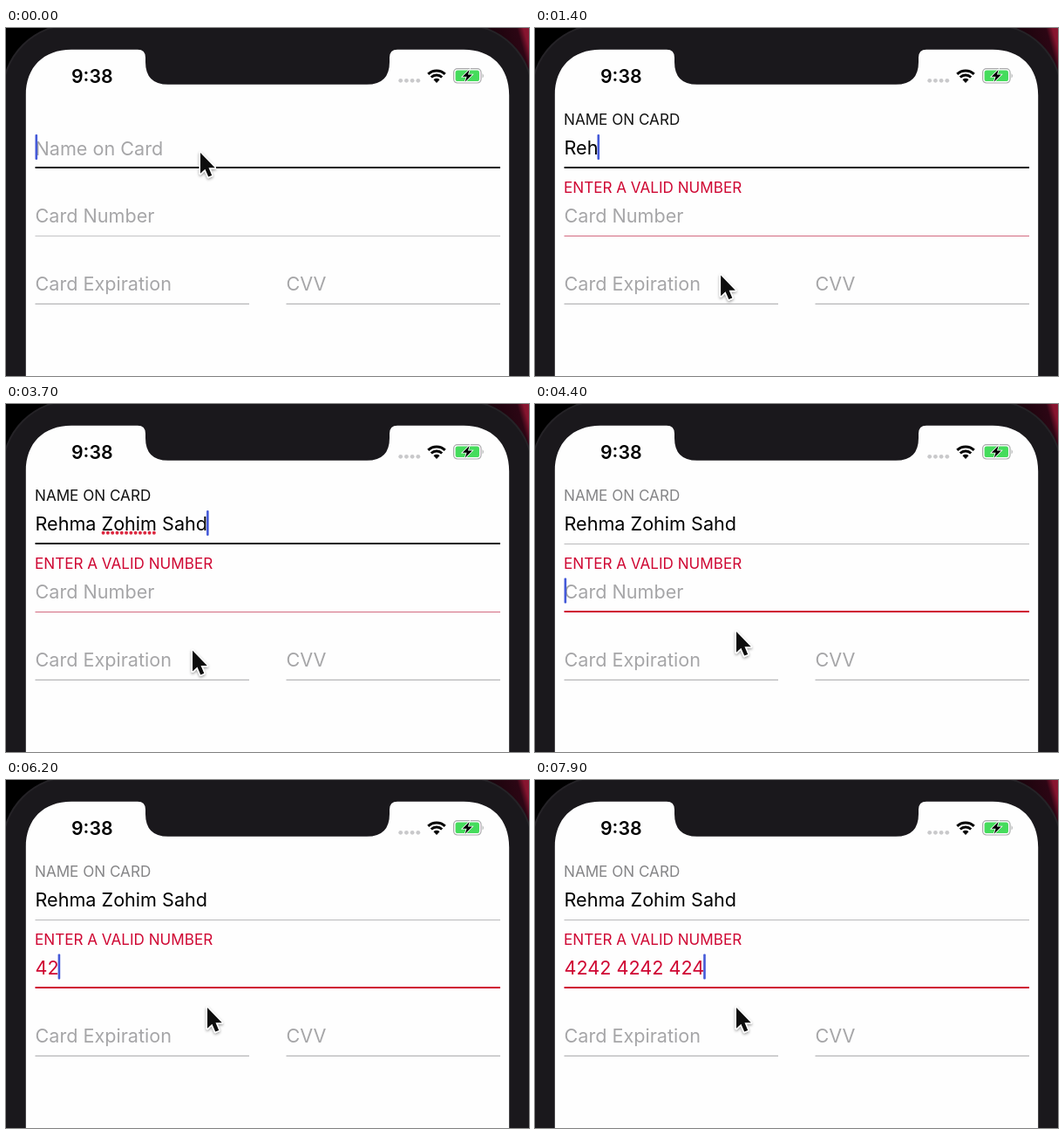
Animation, 600 px wide and 399 px high, one loop 8 s. Source, as an HTML page:

```html
<!DOCTYPE html>
<html lang="en">
<head>
<meta charset="utf-8">
<title>Card form</title>
<style>
  html, body { margin: 0; width: 100%; height: 100%; overflow: hidden; background: #000; }
  svg { display: block; width: 600px; height: 399px; }
  text { font: 400 21.6px Inter, "Liberation Sans", sans-serif; font-optical-sizing: none; white-space: pre; }
  .hint { fill: #a6a6a8; }
  .label { font-size: 17.1px; }
  .clock { font-size: 21.3px; font-weight: 600; }
  .line { stroke: #b6b6b8; stroke-width: 1.2; }
  .caret { fill: #4459d8; }
</style>
</head>
<body>
<svg viewBox="0 0 600 399">
  <defs>
    <linearGradient id="glow" gradientUnits="userSpaceOnUse" x1="550" y1="14" x2="600" y2="0">
      <stop offset="0" stop-color="#16030a"/>
      <stop offset=".74" stop-color="#2c0614"/>
      <stop offset=".88" stop-color="#86142f"/>
      <stop offset="1" stop-color="#8c1631"/>
    </linearGradient>
    <filter id="shadow" x="-50%" y="-50%" width="200%" height="200%">
      <feDropShadow dx="0" dy="1.5" stdDeviation="1.5" flood-opacity=".4"/>
    </filter>
  </defs>

  <rect width="600" height="399"/>
  <rect x="540" width="60" height="60" fill="url(#glow)"/>
  <rect x="-4" y="-4" width="608" height="500" rx="80" fill="#1a181c" stroke="#252327" stroke-width="2"/>
  <path fill="#fefefe" d="M22.8 399V77C22.8 45 43 24.8 75 24.8H151Q160 24.8 160 34V39Q160 64.8 186 64.8H414
    Q440 64.8 440 39V34Q440 24.8 449 24.8H525C557 24.8 577.2 45 577.2 77V399Z"/>

  <text class="clock" x="75" y="62.8">9:38</text>
  <g fill="#c9c9cb">
    <circle cx="452.7" cy="60.3" r="2.4"/><circle cx="459.4" cy="60.3" r="2.4"/>
    <circle cx="466.1" cy="60.3" r="2.4"/><circle cx="472.8" cy="60.3" r="2.4"/>
  </g>
  <g fill="none" stroke="#000" stroke-width="3">
    <path d="M484.3 52.8A14 14 0 0 1 503.7 52.8"/>
    <path d="M487.8 56.5A8.9 8.9 0 0 1 500.2 56.5"/>
  </g>
  <path d="M490.5 59.3A5 5 0 0 1 497.5 59.3L494 62.9Z"/>
  <rect x="513.6" y="46.6" width="31.4" height="16.4" rx="4.4" fill="none" stroke="#a9aaab" stroke-width="1.2"/>
  <rect x="515.6" y="48.6" width="27.4" height="12.4" rx="2.6" fill="#45dc5c"/>
  <path d="M546.6 52Q549 54.8 546.6 57.6Z" fill="#a9aaab"/>
  <path d="M531.6 48L523.8 55.8H528.6L526.6 61.8L534.8 53.6H530Z" stroke="#fff" stroke-width="1.6" paint-order="stroke"/>

  <line class="line" id="nameLine" x1="33.5" x2="567"/>
  <line class="line" id="numLine" x1="33.5" x2="567"/>
  <line class="line" x1="33.5" x2="279" y1="316.3" y2="316.3"/>
  <line class="line" x1="321.5" x2="567" y1="316.3" y2="316.3"/>

  <text class="hint" id="nameHint" x="33.5" y="145.6">Name on Card</text>
  <text class="hint" id="numHint" x="33.5" y="223.2">Card Number</text>
  <text class="hint" x="33.5" y="300.8">Card Expiration</text>
  <text class="hint" x="321.5" y="300.8">CVV</text>
  <text class="label" id="nameLabel" x="33" y="111">NAME ON CARD</text>
  <text class="label" id="numLabel" x="33" y="189" fill="#cf0632">ENTER A VALID NUMBER</text>

  <text id="name" x="33.5" y="144.8"></text>
  <text id="num" x="33.5" y="222.5" fill="#cf0632"></text>
  <line id="spell" y1="147.8" y2="147.8" stroke="#dc2840" stroke-width="4" stroke-linecap="round" stroke-dasharray="0 5.3"/>
  <rect class="caret" id="caret" width="2.6" height="29" rx="1"/>

  <path id="mouse" filter="url(#shadow)" d="M0 0V23.8L5.4 18.7L9.2 27.6L13.2 25.9L9.5 17.3H16.7Z"
    fill="#0a0a0a" stroke="#fff" stroke-width="3" stroke-linejoin="round" paint-order="stroke"/>
</svg>
<script>
const LOOP = 8000, START = 950, FOCUS = 4220, LEFT = 33.5;
const NAME = "Rehma Zohim Sahd", DIGITS = "42424242424";
const nameKeys = [950, 1150, 1350, 1550, 1720, 1870, 2070, 2250, 2380, 2510, 2640, 2780, 2970, 3130, 3290, 3450];
const numKeys = [5870, 6070, 6330, 6560, 6780, 6960, 7130, 7290, 7450, 7670, 7850];
// time, x, y
const moves = [[30, 223, 143], [360, 213, 283.5], [3650, 213.5, 283.5], [4130, 231, 261]];
// time, opacity
const blink = [[560, 1], [700, 0], [949, 0], [950, 1], [4550, 1], [4720, 0], [5120, 0], [5280, 1], [5550, 1], [5710, 0], [5869, 0], [5870, 1]];

const el = {};
document.querySelectorAll("[id]").forEach(e => el[e.id] = e);

const clamp = v => Math.max(0, Math.min(1, v));
const smooth = p => p * p * (3 - 2 * p);
const easeOut = p => 1 - (1 - p) ** 2;
const typed = (keys, t) => keys.filter(k => k <= t).length;
const set = (e, attrs) => { for (const k in attrs) e.setAttribute(k, attrs[k]); };
const show = (e, on) => set(e, { visibility: on ? "visible" : "hidden" });

function track(steps, t) {
  const i = steps.findIndex(s => s[0] > t);
  if (i === 0) return steps[0].slice(1);
  if (i < 0) return steps[steps.length - 1].slice(1);
  const a = steps[i - 1], b = steps[i];
  const p = smooth((t - a[0]) / (b[0] - a[0]));
  return a.slice(1).map((v, k) => v + (b[k + 1] - v) * p);
}

function write(e, s) {
  if (e.textContent !== s) e.textContent = s;
  return s ? e.getComputedTextLength() : 0;
}

// A focused line is thicker and grows upwards from its bottom edge.
function underline(e, bottom, focused, color) {
  const width = focused ? 2 : 1.1, y = bottom - width / 2;
  set(e, { y1: y, y2: y });
  e.style.stroke = color;
  e.style.strokeWidth = width;
}

function draw(t) {
  const count = typed(nameKeys, t), digits = typed(numKeys, t);
  const nameWidth = write(el.name, NAME.slice(0, count));
  const numWidth = write(el.num, DIGITS.slice(0, digits).replace(/(.{4})(?=.)/g, "$1 "));
  const onNumber = t >= FOCUS, started = t >= START;

  show(el.nameHint, !count);
  show(el.numHint, !digits);

  const rise = easeOut(clamp((t - START) / 220));
  const lift = { opacity: rise, transform: `translate(0 ${22 * (1 - rise)})` };
  set(el.nameLabel, { ...lift, fill: onNumber ? "#858587" : "#111" });
  set(el.numLabel, lift);

  underline(el.nameLine, 161, !onNumber, onNumber ? "#b9b9bb" : "#111");
  underline(el.numLine, 239, onNumber, onNumber ? "#cf0632" : started ? "#d36a80" : "#c4c4c6");

  const misspelt = count > 11 && !onNumber;
  show(el.spell, misspelt);
  if (misspelt) set(el.spell, {
    x1: LEFT + el.name.getSubStringLength(0, 6) + 2,
    x2: LEFT + el.name.getSubStringLength(0, 11)
  });

  const width = onNumber ? numWidth : nameWidth;
  set(el.caret, { x: LEFT + width - (width ? 1 : 0), y: onNumber ? 199.5 : 122, opacity: track(blink, t)[0] });

  const [x, y] = track(moves, t);
  set(el.mouse, { transform: `translate(${x} ${y})` });
}

function frame() {
  draw(performance.now() % LOOP);
  requestAnimationFrame(frame);
}
frame();
</script>
</body>
</html>
```
